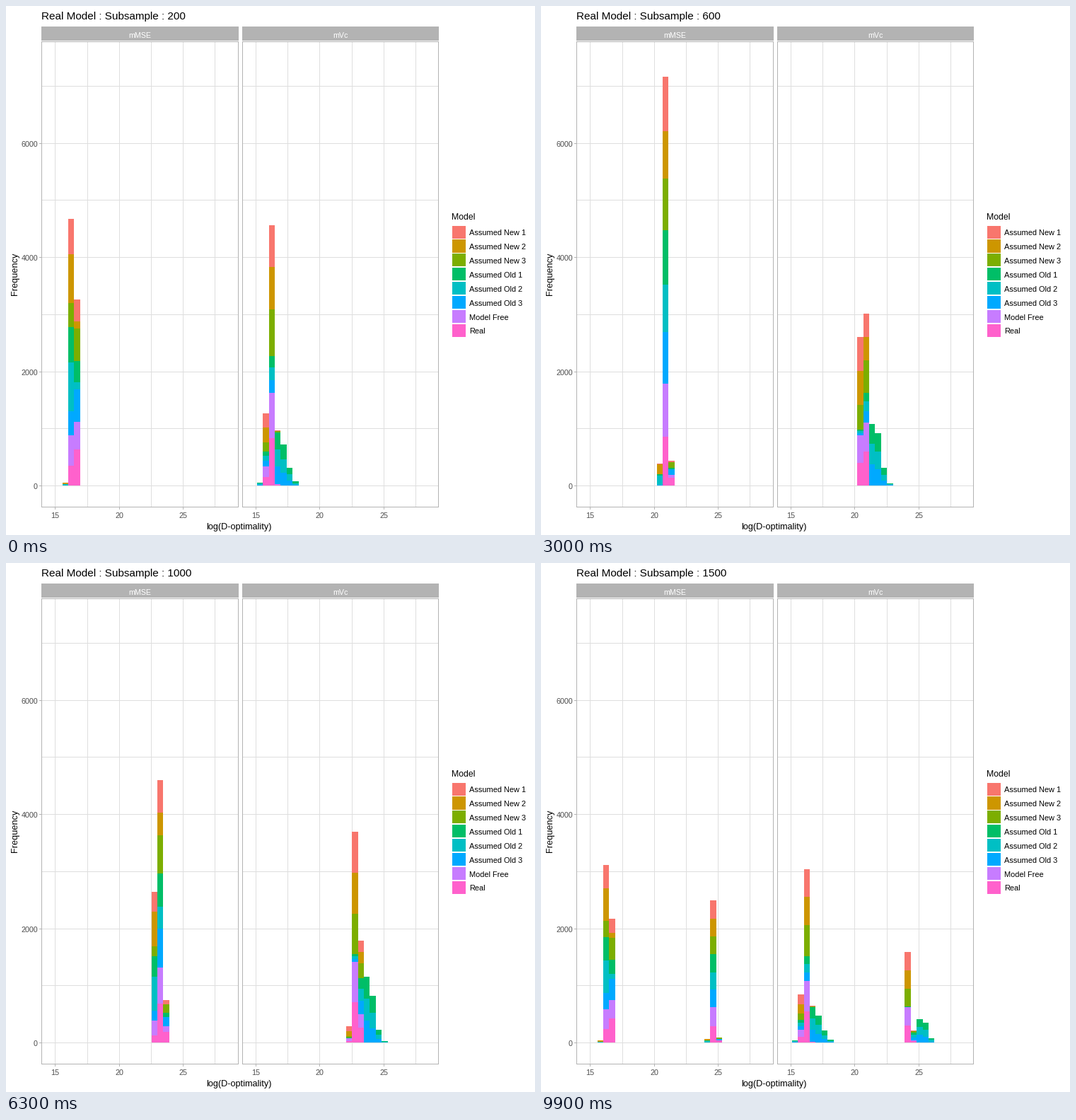
These frames come from a looping animation (748x748 px, 10 s). A matplotlib script:

```python
import math

import numpy as np
import matplotlib.pyplot as plt
from matplotlib.animation import FuncAnimation
from matplotlib.collections import PolyCollection
from matplotlib.patches import Rectangle

SIZE, DPI = 748, 100
FRAMES, INTERVAL = 100, 100
SIZES = range(200, 1501, 100)
BINS, RUNS = 30, 1000

# Per model, bottom of the stack first: name, colour and
# shift of its mean (in bins) in the mMSE and mVc panels
MODELS = [
    ("Real", "#FF61CC", 0.28, 0.07),
    ("Model Free", "#C77CFF", 0.14, 0.02),
    ("Assumed Old 3", "#00A9FF", 0.22, -0.10),
    ("Assumed Old 2", "#00BFC4", -0.21, -0.03),
    ("Assumed Old 1", "#00BE67", 0.06, 0.10),
    ("Assumed New 3", "#7CAE00", 0.22, 0.05),
    ("Assumed New 2", "#CD9600", -0.21, -0.05),
    ("Assumed New 1", "#F8766D", 0.06, -0.05),
]
GREY, GRID, TICK = "#B3B3B3", "#DEDEDE", "#4D4D4D"


def histogram(mean, sd):
    """Expected bin counts of a normal sample, in bin units."""
    cdf = [0.5 * (1 + math.erf((k - mean) / (sd * math.sqrt(2))))
           for k in range(BINS + 1)]
    return RUNS * np.diff(cdf)


def stacks(n):
    """Counts[panel, bin, model] for one subsample size."""
    g = math.log(n / 900)
    sd = 0.32 * (200 / n) ** 0.22
    mse, vc = 17 + 8.75 * g, 16.43 + 8.38 * g - 0.25 * g * g
    out = np.zeros((2, BINS, len(MODELS)))
    for m, (name, _, d_mse, d_vc) in enumerate(MODELS):
        out[0, :, m] = histogram(mse + d_mse, sd)
        if "Old" in name:   # wide and lagging in this panel
            out[1, :, m] = histogram(vc + 2.02 + 0.45 * g + d_vc, 4 * sd)
        else:
            out[1, :, m] = histogram(vc + d_vc, sd)
    return out


counts = [stacks(n) for n in SIZES]

fig = plt.figure(figsize=(SIZE / DPI, SIZE / DPI), dpi=DPI, facecolor="white")
ax = fig.add_axes([0, 0, 1, 1])
ax.set_xlim(0, SIZE)
ax.set_ylim(SIZE, 0)
ax.axis("off")


def box(x, y, w, h, color, z=1, smooth=False):
    ax.add_patch(Rectangle((x, y), w, h, fc=color, ec="none", lw=0,
                           antialiased=smooth, zorder=z))


def text(x, y, s, px, color="black", **kw):
    kw.setdefault("va", "baseline")
    return ax.text(x, y, s, fontsize=px * 72 / DPI, color=color, zorder=6,
                   family="Liberation Sans", **kw)


def y_pos(count):
    return 678.4 - 0.0807 * count


# Panels: name, left edge, right edge, x of the value 15
PANELS = [("mMSE", 50, 328, 69.3), ("mVc", 334, 611, 352.9)]
TOP, BOTTOM = 50, 708
HALF_STEP = 45.22   # 2.5 units on the x axis
BIN_W = 8.4

for name, x0, x1, x15 in PANELS:
    w = x1 - x0 + 1
    for k in range(8):
        box(x0, int(y_pos(1000 * k)), w, 1, GRID)
    for k in range(6):
        x = round(x15 + HALF_STEP * k)
        box(x, TOP, 1, BOTTOM - TOP, GRID)
        if k % 2 == 0:
            box(x, BOTTOM + 1, 1, 3, GREY)
            text(x + 0.5, 724, str(15 + 5 * k // 2), 10.8, TICK, ha="center")
    for y in (TOP, BOTTOM):
        box(x0, y, w, 1, GREY, 4)
    for x in (x0, x1):
        box(x, TOP, 1, BOTTOM - TOP + 1, GREY, 4)
    box(x0, 29, w, 20, GREY)
    text((x0 + x1) / 2, 44.5, name, 10.6, "white", ha="center")

for v in range(0, 6001, 2000):
    y = int(y_pos(v))
    box(47, y, 3, 1, GREY)
    text(45, y + 4.7, str(v), 10.8, TICK, ha="right")

title = text(50, 19, "", 15.3)
text(329, 740, "log(D-optimality)", 12.65, ha="center")
text(13.5, 379, "Frequency", 12.7, rotation=90, ha="center", va="center")

text(630, 302, "Model", 12.3)
for i, (name, color, *_) in enumerate(reversed(MODELS)):
    y = 310.5 + 19.9 * i
    box(631.4, y, 18.2, 18.1, color, smooth=True)
    text(655.5, y + 13.6, name, 10.95)

bars = PolyCollection([], edgecolors="none", linewidths=0,
                      antialiaseds=False, zorder=3)
ax.add_collection(bars, autolim=False)

# First frame of each change; the first three take one step more
STARTS = [4, 12, 20] + list(range(28, 99, 7))


def blend(frame):
    """Return the state being left and how far the change has come."""
    i = sum(s <= frame for s in STARTS) - 1
    if i < 0:
        return 0, 0.0
    steps = 4 if i < 3 else 3
    return i, min(1.0, (frame - STARTS[i] + 1) / steps)


def draw(frame):
    i, t = blend(frame)
    now = (1 - t) * counts[i] + t * counts[(i + 1) % len(SIZES)]
    verts, colors = [], []
    for stack, (_, _, _, x15) in zip(now, PANELS):
        for k in range(BINS):
            left = x15 + 18.7 + BIN_W * (k - 3)
            xa, xb = round(left), round(left + BIN_W)
            ys = np.round(y_pos(np.append(0, np.cumsum(stack[k]))))
            for (_, color, *_), a, b in zip(MODELS, ys, ys[1:]):
                if a > b:
                    verts.append([(xa, a), (xb, a), (xb, b), (xa, b)])
                    colors.append(color)
    bars.set_verts(verts)
    bars.set_facecolor(colors)
    shown = min(i + (t >= 0.5), len(SIZES) - 1)
    title.set_text(f"Real Model : Subsample : {SIZES[shown]}")
    return bars, title


anim = FuncAnimation(fig, draw, frames=FRAMES, interval=INTERVAL,
                     repeat=True, repeat_delay=0, blit=False)
plt.show()
```
